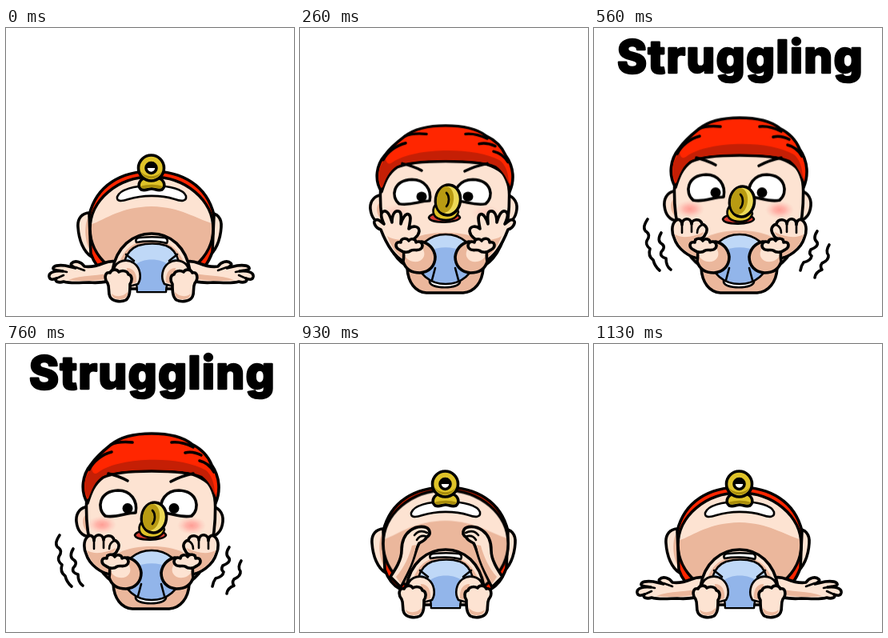
Recreate the animation shown at these times as an HTML page. Size 360x360 px, loop 1.46 s.

```html
<!DOCTYPE html>
<html lang="en">
<head>
<meta charset="utf-8">
<title>Struggling</title>
<style>
html, body { margin: 0; width: 100%; height: 100%; overflow: hidden; background: #fff; }
svg { display: block; width: 100vw; height: 100vh; }

.ink { stroke: #000; stroke-width: 3.6; stroke-linejoin: round; stroke-linecap: round; }
.thin { stroke-width: 2.6; }
.line { fill: none; }
.skin { fill: #fde3d2; }
.shade { fill: #ebb79c; }
.red { fill: #ff2600; }
.darkred { fill: #c51f05; }
.gold { fill: #dfc329; }
.darkgold { fill: #a98d0b; }
.light { fill: #bfd8f7; }
.blue { fill: #92b5ea; }
.white { fill: #fff; }
.title {
  font: 800 56px Inter, "Noto Sans", sans-serif; letter-spacing: 1.6px; text-anchor: middle;
  stroke: #000; stroke-width: 2.6; stroke-linejoin: round;
}

/* Every change is a hard cut within the 1460 ms loop */
.cut { animation: 1460ms step-end infinite; }
.lie { animation-name: lie; }
.sit { animation-name: sit; }
.strain { animation-name: strain; }
.spread { animation-name: spread; }
.flat { animation-name: flat; }
.raised { animation-name: raised; }
.opening { animation-name: opening; }
.dome { animation-name: dome; transform-origin: 182px 300px; }
.head { animation-name: head; transform-origin: 182px 290px; }
.coin { animation-name: coin; }
.cheeks { animation-name: cheeks; }
.toes { animation-name: toes; }

@keyframes lie { 0%, 63.6986%, 100% { opacity: 1 } 17.8082% { opacity: 0 } }
@keyframes sit { 0%, 63.6986%, 100% { opacity: 0 } 17.8082% { opacity: 1 } }
@keyframes strain { 0%, 58.9041%, 100% { opacity: 0 } 24.6575% { opacity: 1 } }
@keyframes spread { 0%, 58.9041%, 100% { opacity: 1 } 24.6575% { opacity: 0 } }
@keyframes flat { 0%, 77.3973%, 100% { opacity: 1 } 8.9041% { opacity: 0 } }
@keyframes raised { 0%, 17.8082%, 70.5479%, 100% { opacity: 0 } 8.9041%, 63.6986% { opacity: 1 } }
@keyframes opening { 0%, 77.3973%, 100% { opacity: 0 } 70.5479% { opacity: 1 } }
@keyframes dome { 0%, 77.3973%, 100% { transform: none } 8.9041% { transform: scale(1.015, 1.03) } }
@keyframes head {
  0%, 58.9041%, 100% { transform: scaleY(.949) }
  24.6575% { transform: none }
  31.5068% { transform: translateY(-.4px) }
  38.3562% { transform: translateY(-.8px) }
  52.0548% { transform: translateY(-1.1px) }
}
@keyframes coin { 0%, 58.9041%, 100% { transform: translateY(-2px) } 24.6575% { transform: none } }
@keyframes cheeks { 0%, 58.9041%, 100% { opacity: .35 } 24.6575% { opacity: 1 } }
@keyframes toes {
  0%, 58.9041%, 100% { transform: translate(0, 2px) }
  24.6575% { transform: none }
  38.3562% { transform: translate(.5px, -.3px) }
  52.0548% { transform: translate(1px, -.5px) }
}
</style>
</head>
<body>
<svg viewBox="0 0 360 360">
  <defs>
    <radialGradient id="blush">
      <stop offset="0" stop-color="#ff9d94"/>
      <stop offset=".4" stop-color="#ffaca3" stop-opacity=".85"/>
      <stop offset="1" stop-color="#ffc4b8" stop-opacity="0"/>
    </radialGradient>
    <clipPath id="domeClip"><ellipse cx="182" cy="251" rx="77" ry="65"/></clipPath>
    <clipPath id="bellyClip"><ellipse cx="182" cy="289" rx="36" ry="31"/></clipPath>

    <g id="lieEar">
      <path class="ink skin" d="M105 231 C95 231 89 238 90 249 C91 265 97 280 107 286Z"/>
      <path class="shade" d="M102 238 C97 250 99 270 106 279Z"/>
    </g>
    <g id="flatArm">
      <path class="ink skin" d="M150 302 C144 290 132 290 122 294 C112 298 104 299 98 298 C94 292 86 290 82 294 C80 296 83 298 87 300 L74 297 C66 296 58 297 59 301 C60 303 66 303 71 304 C62 303 53 305 54 311 C55 316 60 314 63 313 C60 317 66 319 72 317 C82 320 95 318 104 318 C115 319 128 318 142 312Z"/>
      <path class="shade" d="M78 315 C95 308 116 311 139 304 L138 311 C120 316 98 317 78 315Z"/>
      <path class="ink thin line" d="M87 299 L98 303 M63 313 L72 309 M71 304 L76 305"/>
    </g>
    <g id="raisedArm">
      <path class="ink skin" d="M113 291 C119 282 127 270 127 258 C127 246 131 238 138 233 C146 227 158 227 161 232 C164 237 161 240 158 242 C156 246 152 247 149 249 C146 254 145 260 142 268 C138 280 132 292 126 304Z"/>
      <path class="shade" d="M120 291 C130 280 137 264 140 252 L145 251 C143 268 134 286 126 300Z"/>
      <path class="ink thin line" d="M143 239 C147 234 153 233 159 236 M146 245 C149 240 154 239 159 241"/>
    </g>
    <g id="lieLeg">
      <path class="ink thin skin" d="M135 301 C138 290 152 288 160 294 C168 300 170 312 165 320 L150 324Z"/>
      <path class="shade" d="M151 300 C160 300 164 308 163 318 L153 321Z"/>
      <path class="ink skin" d="M127 319 C122 313 124 304 130 306 C132 301 139 301 141 305 C146 302 152 304 153 308 C158 309 158 316 155 320 C155 328 155 336 150 340 C144 343 133 342 130 336 C127 330 130 325 127 319Z"/>
      <path class="shade" d="M132 332 C138 337 146 336 152 330 C152 337 148 339 142 339 C136 339 133 337 132 332Z"/>
    </g>

    <g id="sitEar">
      <path class="ink skin" d="M105 205 C94 203 87 212 88 223 C89 233 94 241 104 242Z"/>
      <path class="shade" d="M100 214 C94 219 95 231 102 236Z"/>
    </g>
    <g id="spreadHand">
      <path class="ink skin" d="M101 252 C94 250 90 241 95 240 C98 238 102 243 105 245 C101 236 100 230 105 229 C110 228 113 236 115 243 C115 234 118 228 123 229 C128 230 126 238 126 245 C128 238 132 231 136 233 C140 236 137 244 136 251 C142 246 149 248 149 254 C148 261 140 266 132 269 L130 292 C118 286 108 270 101 252Z"/>
      <path class="shade" d="M109 260 C116 265 128 266 138 262 L130 267 L128 288 C119 281 113 271 109 260Z"/>
    </g>
    <g id="foldedHand">
      <path class="ink skin" d="M100 262 C97 256 97 246 101 242 C105 237 110 240 110 246 C110 237 121 236 122 245 C122 239 133 237 135 245 C141 247 143 252 139 258 C137 264 131 264 127 264 C127 272 130 280 134 288 C120 288 104 276 100 262Z"/>
      <path class="shade" d="M101 258 C109 263 124 262 137 255 C136 262 130 262 125 263 C125 272 128 280 131 286 C119 285 105 274 101 258Z"/>
      <path class="ink thin line" d="M110 246 V256 M122 245 V255 M135 246 C131 248 129 252 129 256"/>
    </g>
    <g id="sitLeg">
      <path class="ink shade" d="M129 271 C130 281 130 287 129 292 C132 302 140 306 150 306 C162 305 169 297 169 286 C168 276 161 269 152 267Z"/>
      <path class="skin" d="M131 273 H151 C157 279 157 287 150 291 C143 294 135 291 132 286Z"/>
      <path class="cut toes ink skin" d="M124 275 C118 272 119 264 126 266 C126 260 134 260 136 264 C139 260 145 262 145 266 C150 263 155 268 152 273 C148 278 143 274 139 276 C134 280 128 278 124 275Z"/>
    </g>
    <g id="eye">
      <path class="ink white" d="M124 216 C113 207 116 185 140 184 C156 184 165 197 162 212 C149 212 138 219 124 216Z"/>
    </g>
  </defs>

  <g class="cut lie">
    <use href="#lieEar"/>
    <use href="#lieEar" transform="matrix(-1 0 0 1 359 0)"/>
    <path class="ink red" d="M104 234 C113 196 145 179 182 179 C219 179 251 196 260 234 L258 280 C252 296 246 302 238 307 H126 C116 302 110 294 106 282Z"/>
    <g class="cut dome">
      <ellipse class="skin" cx="182" cy="251" rx="77" ry="65"/>
      <path class="shade" clip-path="url(#domeClip)" d="M100 248 C125 240 140 224 182 223 C222 224 238 240 264 246 V320 H100Z"/>
      <ellipse class="ink line" cx="182" cy="251" rx="77" ry="65"/>
    </g>
    <path class="ink thin white" d="M139 211 C142 202 160 197 182 197 C206 197 222 202 225 210 C226 217 219 217 211 214 C192 208 170 209 153 214 C144 217 138 217 139 211Z"/>
    <path class="ink gold" d="M172 188 H192 C198 191 200 198 195 202 C190 204 186 201 182 201 C178 201 174 204 169 202 C164 198 166 191 172 188Z"/>
    <path class="darkgold" d="M168 198 C177 195 188 195 196 198 C194 202 187 199 182 199 C177 199 170 202 168 198Z"/>
    <circle class="ink gold" cx="181.500" cy="175" r="16"/>
    <path class="darkgold" d="M168 178 A14 14 0 0 0 195 178 A14 10 0 0 1 168 178Z"/>
    <circle class="ink white" cx="181.500" cy="175" r="6.500"/>
    <path d="M175 175 C177 168 186 168 188 175Z"/>

    <g class="cut flat">
      <use href="#flatArm"/>
      <use href="#flatArm" transform="matrix(-1 0 0 1 363 0)"/>
    </g>
    <g class="cut raised">
      <use href="#raisedArm"/>
      <use href="#raisedArm" transform="matrix(-1 0 0 1 366 0)"/>
    </g>
    <g class="cut opening">
      <use href="#raisedArm" transform="rotate(-62 124 298)"/>
      <use href="#raisedArm" transform="matrix(-1 0 0 1 363 0) rotate(-62 124 298)"/>
    </g>

    <path class="ink skin" d="M133 303 C138 274 158 257 182 257 C206 257 225 274 230 303 L212 326 H150Z"/>
    <path class="shade" d="M142 292 C150 272 164 266 182 266 C200 266 213 272 222 292 L205 310 H158Z"/>
    <path class="ink thin light" d="M148 292 C151 281 157 275 165 272 C176 269 190 269 200 272 C208 275 213 281 216 292 C207 301 201 313 200 330 H164 C164 314 158 300 148 292Z"/>
    <path class="blue" d="M161 297 C169 287 195 287 204 297 C200 307 199 318 199 329 H165 C165 318 164 306 161 297Z"/>
    <path class="ink thin line" d="M150 283 L160 291 M214 283 L204 291"/>
    <path class="ink thin white" d="M163 268 C161 264 164 262 168 262 C177 261 188 261 197 262 C201 262 203 265 201 269 C190 266 174 266 163 268Z"/>
    <use href="#lieLeg"/>
    <use href="#lieLeg" transform="matrix(-1 0 0 1 363 0)"/>
  </g>

  <g class="cut sit">
    <path class="ink shade" d="M134 300 C135 318 144 330 158 331 H204 C218 330 228 318 229 300Z"/>

    <g class="cut head">
      <use href="#sitEar"/>
      <use href="#sitEar" transform="matrix(-1 0 0 1 359 0)"/>
      <path class="ink skin" d="M101 188 C98 235 107 270 122 288 C135 304 155 308 182 308 C209 308 228 304 241 288 C256 270 264 235 261 188 C250 145 112 145 101 188Z"/>
      <path class="shade" d="M121 283 C130 263 151 254 182 254 C213 254 233 263 241 283 C228 301 210 305 182 305 C154 305 134 301 121 283Z"/>
      <g class="cut cheeks" fill="url(#blush)">
        <ellipse cx="120" cy="227" rx="18" ry="11"/>
        <ellipse cx="232" cy="228" rx="18" ry="11"/>
      </g>
      <path class="ink red" d="M102 200 C92 184 96 164 106 152 C112 143 121 135 131 127 C143 117 161 113 182 113 C204 113 221 117 232 126 C244 132 253 142 257 152 C268 168 268 186 262 200 C260 186 255 174 245 167 C229 161 206 160 182 160 C158 160 135 161 121 168 C110 176 106 187 102 200Z"/>
      <path class="darkred" d="M103 195 C95 182 98 167 107 156 C108 163 111 165 116 161 C142 142 218 140 250 159 C256 164 261 174 261 190 C258 181 253 172 245 166 C229 159 206 158 182 158 C158 158 135 159 121 166 C111 173 107 183 103 195Z"/>
      <path class="ink line" d="M131 127 C139 123 148 123 158 124 M132 136 C120 139 109 148 104 158 M207 124 C217 123 226 126 234 130 M224 137 C232 135 238 137 244 140 M242 147 C250 149 256 154 260 161"/>
      <use href="#eye"/>
      <use href="#eye" transform="matrix(-1 0 0 1 356 0)"/>
      <circle cx="152" cy="206.500" r="6.500"/>
      <circle cx="210" cy="206.500" r="6.500"/>
      <path class="ink line" d="M128 163 Q141 166 152 172 M206 173 Q219 166 234 163"/>
    </g>

    <g class="cut coin">
      <path class="ink thin" fill="#d83c32" d="M161 239 C164 231 197 230 200 239 C198 246 163 247 161 239Z"/>
      <path class="ink thin gold" d="M171 221 C164 228 165 238 175 241 C185 244 196 241 198 232 L194 222Z"/>
      <ellipse class="ink" fill="#ecd956" cx="185" cy="217" rx="15.500" ry="19" transform="rotate(8 185 217)"/>
      <ellipse cx="181.500" cy="216.500" rx="10.500" ry="16.500" fill="#b99b12" transform="rotate(8 181.500 216.500)"/>
      <path class="ink thin line" d="M183 208 C187 212 187 220 183 225"/>
    </g>

    <path class="ink thin white" d="M162 316 C160 327 202 327 200 316Z"/>
    <ellipse class="light" cx="182" cy="289" rx="36" ry="31"/>
    <path class="blue" clip-path="url(#bellyClip)" d="M146 296 C158 267 206 267 218 296 V321 H146Z"/>
    <ellipse class="ink thin line" cx="182" cy="289" rx="36" ry="31"/>
    <path class="ink thin line" d="M169 300 L165 315 M194 300 L198 315"/>

    <g class="cut spread">
      <use href="#spreadHand"/>
      <use href="#spreadHand" transform="matrix(-1 0 0 1 361 0)"/>
    </g>
    <g class="cut strain">
      <use href="#foldedHand"/>
      <use href="#foldedHand" transform="matrix(-1 0 0 1 363 0)"/>
    </g>
    <use href="#sitLeg"/>
    <use href="#sitLeg" transform="matrix(-1 0 0 1 363 0)"/>
  </g>

  <g class="cut strain">
    <text class="title" x="183" y="55.500">Struggling</text>
    <path class="ink line" d="M67 239 Q59 251 66 255 Q71 259 66 266 Q64 271 70 276 Q67 285 74 290 Q76 298 82 303 M84 256 Q78 266 85 270 Q90 274 84 280 Q82 286 90 288 Q90 298 96 302 M279 254 Q273 263 279 268 Q281 273 271 277 Q268 282 272 285 Q271 291 262 293 Q259 297 258 303 M294 271 Q289 279 293 284 Q294 290 285 294 Q282 298 285 302 Q277 305 276 312"/>
  </g>
</svg>
</body>
</html>
```
